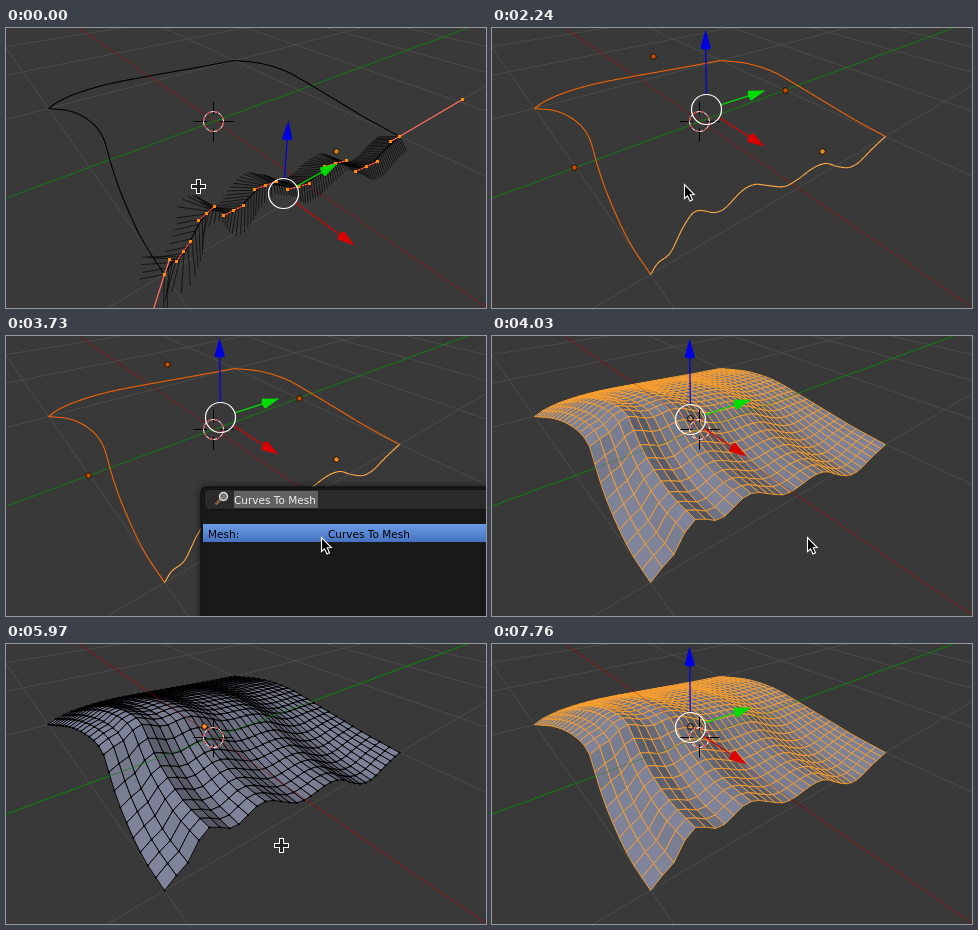
Write an HTML page with a canvas that moves like this. It is 480 by 280 pixels and loops after 7.9 s.

```html
<!DOCTYPE html>
<html lang="en">
<head>
<meta charset="utf-8">
<style>
html, body { margin: 0; height: 100%; overflow: hidden; background: #393939; }
canvas { display: block; }
</style>
</head>
<body>
<canvas id="stage" width="480" height="280"></canvas>
<script>
const g = document.getElementById('stage').getContext('2d');
const LOOP = 7900, ROWS = 24, COLS = 32, UNIT = 90;
const ACTIVE = '#ffaa40', SELECTED = '#ee6206';

// Perspective of the ground square [-1,1]²; h is height in scaled pixels.
function project(u, v, h = 0) {
  const w = 1 - .241 * u + .187 * v;
  return [(208 + 23.1 * u + 140.7 * v) / w, (93.2 + 28.2 * u - 19.3 * v - h) / w, w];
}

// Smooth y(x) through a few points.
function spline(...p) {
  const slope = i => {
    const a = p[Math.max(i - 1, 0)], b = p[Math.min(i + 1, p.length - 1)];
    return (b[1] - a[1]) / (b[0] - a[0]);
  };
  const at = x => {
    let i = 0;
    while (i < p.length - 2 && x > p[i + 1][0]) i++;
    const [x0, y0] = p[i], [x1, y1] = p[i + 1], d = x1 - x0, t = (x - x0) / d;
    const s = t * t * (3 - 2 * t);
    return y0 + (y1 - y0) * s + d * t * (1 - t) * (slope(i) * (1 - t) - slope(i + 1) * t);
  };
  return { at, from: p[0][0], to: p[p.length - 1][0] };
}

const back = spline([42, 80], [52, 73], [70, 65], [100, 56], [140, 48], [185, 40], [228, 32]);
const right = spline([228, 32], [255, 35], [280, 43], [300, 54], [330, 72], [360, 90], [393, 108]);
const left = spline([42, 80], [65, 83], [85, 94], [97, 110], [105, 137], [115, 166], [135, 210], [158, 246]);
const front = spline([158, 246], [165, 235], [178, 224], [190, 200], [200, 185], [208, 182], [222, 184],
  [232, 180], [250, 162], [262, 156], [275, 157], [292, 158], [305, 151], [320, 140], [333, 135],
  [345, 138], [356, 139], [366, 134], [380, 120], [393, 108]);

function edgeHeight(curve, u, v) {
  const [x, y, w] = project(u, v);
  return (y - curve.at(Math.min(Math.max(x, curve.from), curve.to))) * w;
}
function height(u, v) {
  const s = (u + 1) / 2, t = (v + 1) / 2;
  return (1 - s) * edgeHeight(back, -1, v) + s * edgeHeight(front, 1, v)
       + (1 - t) * edgeHeight(left, u, -1) + t * edgeHeight(right, u, 1);
}

const mesh = [], quads = [];
for (let i = 0; i <= ROWS; i++) {
  mesh.push([]);
  for (let j = 0; j <= COLS; j++) {
    const u = i / ROWS * 2 - 1, v = j / COLS * 2 - 1, h = height(u, v);
    mesh[i].push({ p: project(u, v, h), z: h / UNIT });
  }
}
for (let i = 0; i < ROWS; i++) for (let j = COLS - 1; j >= 0; j--) {
  const a = mesh[i][j], b = mesh[i][j + 1], c = mesh[i + 1][j + 1], d = mesh[i + 1][j];
  const nu = (a.z + b.z - c.z - d.z) * ROWS / 4, nv = (a.z + d.z - b.z - c.z) * COLS / 4;
  const lit = (.15 * nu - .55 * nv + .8) / Math.hypot(nu, nv, 1);
  const k = Math.min(1, Math.max(0, lit * 1.25 - .2));
  quads.push({ pts: [a, b, c, d].map(q => q.p),
    fill: `rgb(${66 + 62 * k},${68 + 64 * k},${76 + 78 * k})` });
}

function path(pts, close) {
  g.beginPath();
  pts.forEach(([x, y]) => g.lineTo(x + .5, y + .5));
  if (close) g.closePath();
}
function line(pts, color, width = 1) {
  path(pts);
  g.strokeStyle = color;
  g.lineWidth = width;
  g.stroke();
}
function circle(x, y, r, stroke, fill, width = 1) {
  g.beginPath();
  g.arc(x + .5, y + .5, r, 0, 7);
  g.lineWidth = width;
  if (fill) { g.fillStyle = fill; g.fill(); }
  if (stroke) { g.strokeStyle = stroke; g.stroke(); }
}
function rect(x, y, w, h, fill) {
  g.fillStyle = fill;
  g.fillRect(x, y, w, h);
}
function curveLine(curve, color) {
  const pts = [];
  for (let x = curve.from; x <= curve.to; x++) pts.push([x, curve.at(x)]);
  line(pts, color, 1.1);
}
const origin = (x, y, fill) => circle(x, y, 2.8, '#1a0d00', fill);

function through(a, b, color) {
  const dx = b[0] - a[0], dy = b[1] - a[1], k = 900 / Math.hypot(dx, dy);
  line([[a[0] - dx * k, a[1] - dy * k], [a[0] + dx * k, a[1] + dy * k]], color);
}
function axes() {
  line([[73, 0], [480, 279]], '#7c1818');
  line([[0, 169.5], [461, -.5]], '#127a12');
}
function ground() {
  rect(0, 0, 480, 280, '#393939');
  for (let k = -4; k <= 1; k++) if (k) through(project(k, -1), project(k, 1), '#4a4a4a');
  for (let k = -1; k <= 6; k++) if (k) through(project(-1, k), project(1, k), '#4a4a4a');
  axes();
}

function cursor3d() {
  const x = 207, y = 93;
  for (const [dx, dy] of [[1, 0], [-1, 0], [0, 1], [0, -1]])
    line([[x + dx * 7, y + dy * 7], [x + dx * 20, y + dy * 20]], '#000');
  circle(x, y, 10, '#fff');
  g.setLineDash([4, 4]);
  circle(x, y, 10, '#e01818');
  g.setLineDash([]);
}

function arrow(cx, cy, tx, ty, color) {
  const d = Math.hypot(tx - cx, ty - cy), ux = (tx - cx) / d, uy = (ty - cy) / d;
  const len = 18 - Math.abs(ux) * 2, bx = tx - ux * len, by = ty - uy * len, r = 5;
  if (d > 32) line([[cx + ux * 15, cy + uy * 15], [bx, by]], color, 1.2);
  path([[bx - uy * r, by + ux * r], [tx, ty], [bx + uy * r, by - ux * r]], true);
  g.fillStyle = color;
  g.fill();
  g.beginPath();
  g.ellipse(bx + .5, by + .5, 2, r, Math.atan2(uy, ux), 0, 7);
  g.fill();
}
function gizmo(x, y, blue, green, red) {
  arrow(x, y, ...green, '#00dc00');
  arrow(x, y, ...red, '#dc0000');
  arrow(x, y, ...blue, '#0000e0');
  circle(x, y, 15, '#fff', null, 1.2);
}

function editCurve() {
  const f = .115, n = 96;
  for (let i = 0; i <= n; i++) {
    const v = i / n * 2 - 1, e = .01, h = edgeHeight(front, 1, v);
    const dz = (edgeHeight(front, 1, Math.min(1, v + e)) - edgeHeight(front, 1, Math.max(-1, v - e)))
      / UNIT / (Math.min(1, v + e) - Math.max(-1, v - e));
    const k = f / Math.hypot(1, dz), arm = s => project(1 + s * f, v - k, h - dz * k * UNIT);
    line([arm(1), project(1, v, h), arm(-1)], 'rgba(0,0,0,.8)', .8);
  }
  const dot = (x, y) => rect(x - 1, y - 1, 3, 3, '#ff8a0c');
  line([[144, 290], [158, 246], [163, 231]], '#ff6a5c', 1.3);
  line([[384, 113], [393, 108], [456, 71]], '#ff6a5c', 1.3);
  for (const [x, y, dx, dy] of [[177, 223, 7, 10], [200, 185, 8, 7], [227, 182, 10, 5], [259, 157, 11, 4],
    [292, 158, 11, 3], [329, 135, 11, 3], [360, 138, 11, 5]]) {
    const a = [x - dx, y + dy], b = [x + dx, y - dy];
    line([a, b], '#8c1a14', 1.4);
    g.setLineDash([2, 1]);
    line([a, b], '#ff8070');
    g.setLineDash([]);
    dot(x, y); dot(...a); dot(...b);
  }
  [[158, 246], [163, 231], [384, 113], [393, 108], [456, 71]].forEach(p => dot(...p));
}

function surface(edge, edit) {
  for (const q of quads) {
    path(q.pts, true);
    g.fillStyle = q.fill;
    g.fill();
    g.strokeStyle = edge;
    g.lineWidth = edit ? .9 : .85;
    g.stroke();
  }
  if (edit) for (const row of mesh) for (const { p } of row) rect(p[0] - .5, p[1] - .5, 2, 2, '#000');
  g.globalAlpha = edit ? .6 : .35;
  axes();
  g.globalAlpha = 1;
}

function popup() {
  g.save();
  g.shadowColor = 'rgba(0,0,0,.6)';
  g.shadowBlur = 9;
  g.fillStyle = '#191919';
  g.beginPath();
  g.roundRect(195, 151, 310, 160, 5);
  g.fill();
  g.restore();
  g.strokeStyle = '#0c0c0c';
  g.lineWidth = 1;
  g.stroke();
  g.fillStyle = '#2a2a2a';
  g.beginPath();
  g.roundRect(198.5, 153.5, 300, 20, 4);
  g.fill();
  g.strokeStyle = '#111';
  g.stroke();
  rect(228, 155, 84, 17, '#606060');
  line([[214, 163], [209, 168]], '#8a5a3c', 2.5);
  circle(217, 160, 4, '#ddd', '#777', 1.4);
  const blue = g.createLinearGradient(0, 188, 0, 206);
  blue.addColorStop(0, '#6c9ce6');
  blue.addColorStop(1, '#4672c0');
  rect(197, 188, 283, 18, blue);
  g.font = '10.5px "DejaVu Sans", sans-serif';
  const text = (s, x, y, fill) => { g.fillStyle = fill; g.fillText(s, x, y); };
  text('Curves To Mesh', 228, 168, '#eee');
  text('Mesh:', 202, 202, '#000');
  text('Curves To Mesh', 322, 202, '#000');
}

const pointers = {
  arrow(x, y) {
    path([[0, 0], [0, 14], [3, 11.3], [5.5, 16.5], [8, 15.3], [5.7, 10.3], [9.8, 10]]
      .map(p => [x + p[0], y + p[1]]), true);
    g.fillStyle = '#000';
    g.fill();
    g.strokeStyle = '#fff';
    g.lineWidth = 1.1;
    g.stroke();
  },
  cross(x, y) {
    rect(x - 7, y - 2, 15, 5, '#fff');
    rect(x - 2, y - 7, 5, 15, '#fff');
    rect(x - 6, y - 1, 13, 3, '#222');
    rect(x - 1, y - 6, 3, 13, '#222');
  },
  beam(x, y) {
    rect(x - 3, y - 8, 3, 1, '#fff');
    rect(x + 1, y - 8, 3, 1, '#fff');
    rect(x, y - 7, 1, 15, '#fff');
    rect(x - 3, y + 8, 3, 1, '#fff');
    rect(x + 1, y + 8, 3, 1, '#fff');
  }
};
const moves = [
  [0, 'cross', 192, 158], [1040, 'arrow', 192, 156], [2690, 'beam', 190, 158], [2990, 'beam', 236, 184],
  [3130, 'beam', 312, 202], [3280, 'beam', 313, 202], [3730, 'arrow', 315, 201], [5080, 'arrow', 294, 200],
  [5230, 'arrow', 275, 200], [5970, 'cross', 275, 201], [6870, 'arrow', 275, 200], [7320, 'arrow', 324, 233],
  [7470, 'arrow', 377, 272], [7610, 'arrow', 383, 275], [7760]
];

function curvesScene(t) {
  const all = t >= 2240, rest = all ? SELECTED : '#000';
  [back, right, left].forEach(c => curveLine(c, rest));
  curveLine(front, all || t >= 1040 && t < 1940 ? ACTIVE : '#000');
  cursor3d();
  if (t < 1040) {
    editCurve();
    origin(330, 123, '#d08020');
    gizmo(277, 165, [282, 92], [331, 135], [348, 217]);
  } else if (t < 1940) {
    gizmo(330, 123, [341, 46], [378, 98], [410, 167]);
    origin(330, 123, '#e08a28');
  } else if (all) {
    [[161, 28], [293, 62], [82, 139]].forEach(p => origin(...p, '#c04e00'));
    origin(330, 123, '#e08a28');
    gizmo(214, 81, [213, 1], [273, 62], [272, 118]);
  }
  if (t >= 2690) popup();
}

function meshScene(t) {
  const edit = t >= 5970 && t < 6870;
  surface(edit ? '#000' : '#ffa22e', edit);
  cursor3d();
  if (edit) return origin(198, 82, '#f08a28');
  circle(198, 82, 3, '#111');
  gizmo(198, 83, [197, 2], [259, 63], [254, 120]);
}

function frame(now) {
  const t = now % LOOP;
  ground();
  (t < 4030 ? curvesScene : meshScene)(t);
  const [, kind, x, y] = moves.filter(m => m[0] <= t).pop();
  if (kind) pointers[kind](x, y);
  requestAnimationFrame(frame);
}
const start = performance.now();
frame(0);
function tick() { return performance.now() - start; }
</script>
</body>
</html>
```
